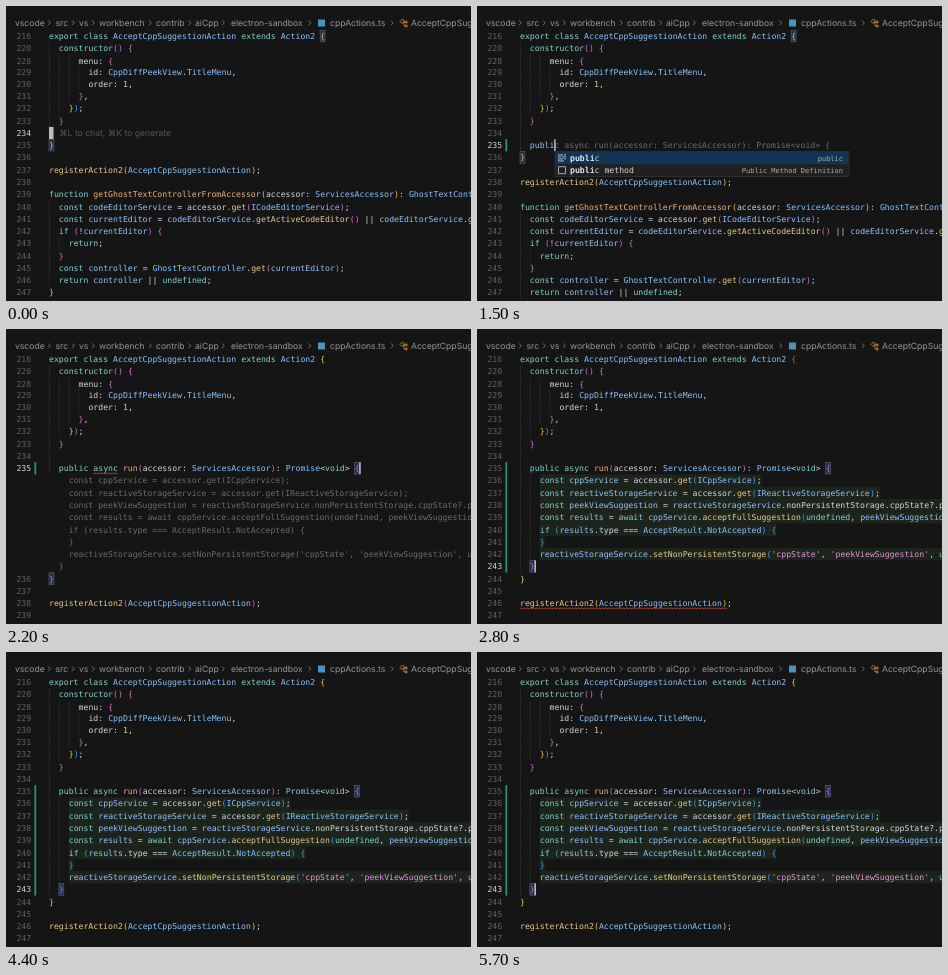
An HTML page that plays this animation: 465 by 295 pixels, repeating every 5.8 s.

```html
<!DOCTYPE html>
<html lang="en">
<head>
<meta charset="utf-8">
<style>
  html, body { margin: 0; width: 100%; height: 100%; overflow: hidden; background: #151515; }
  svg { display: block; }
  text { white-space: pre; text-rendering: geometricPrecision; }
  .code { font: 8.19px "DejaVu Sans Mono", monospace; }
  .ui { font: 8.6px Inter, sans-serif; fill: #969696; }
  .detail { font: 7px "DejaVu Sans Mono", monospace; fill: #a9adb3; text-anchor: end; }
</style>
</head>
<body>
<svg id="stage" width="465" height="295" viewBox="0 0 465 295"></svg>
<script>
const LOOP = 5800;
const LEFT = 43, CHAR = 4.93, LINE = 12.27;
const ENTER = 400, ACCEPT_LINE = 1900, SUGGEST = 2100, ACCEPT_BODY = 2600, CHECKED = 3050;
const TYPING = [[700, 'p'], [1100, 'pu'], [1200, 'pub'], [1300, 'publ'], [1400, 'publi'], [1600, 'public']];
const POPUP = 1200, GHOST = 1300;

const SIGNATURE = '  public async run(accessor: ServicesAccessor): Promise<void> {';
const BODY = [
  '    const cppService = accessor.get(ICppService);',
  '    const reactiveStorageService = accessor.get(IReactiveStorageService);',
  '    const peekViewSuggestion = reactiveStorageService.nonPersistentStorage.cppState?.peekViewSuggestion;',
  '    const results = await cppService.acceptFullSuggestion(undefined, peekViewSuggestion);',
  '    if (results.type === AcceptResult.NotAccepted) {',
  '    }',
  "    reactiveStorageService.setNonPersistentStorage('cppState', 'peekViewSuggestion', undefined);",
  '  }'
];
const HEAD = ['        id: CppDiffPeekView.TitleMenu,', '        order: 1,', '      },', '    });', '  }'];
const TAIL = [
  '}', '', 'registerAction2(AcceptCppSuggestionAction);', '',
  'function getGhostTextControllerFromAccessor(accessor: ServicesAccessor): GhostTextController {',
  '  const codeEditorService = accessor.get(ICodeEditorService);',
  '  const currentEditor = codeEditorService.getActiveCodeEditor() || codeEditorService.getFocused();',
  '  if (!currentEditor) {', '    return;', '  }',
  '  const controller = GhostTextController.get(currentEditor);',
  '  return controller || undefined;', '}'
];

const KEYWORD = /^(export|class|extends|constructor|public|async|await|const|function|if|return|undefined|void)$/;
const BRACKETS = ['#e9c84a', '#d070d0', '#3b9ff0'];
const PLAIN = '#d6d6dd';

const stage = document.getElementById('stage');
const colX = col => LEFT + col * CHAR;
const rowY = row => 65.6 + row * LINE;
const escape = s => s.replace(/&/g, '&amp;').replace(/</g, '&lt;');
const text = (x, y, s, attrs) => `<text x="${x.toFixed(2)}" y="${(y + 3).toFixed(2)}" ${attrs}>${escape(s)}</text>`;
const rect = (x, y, w, h, fill, extra = '') =>
  `<rect x="${x}" y="${y}" width="${w}" height="${h}" fill="${fill}" ${extra}/>`;
const stroke = (d, color, width) => `<path d="${d}" fill="none" stroke="${color}" stroke-width="${width}"/>`;
const code = (col, y, s, fill, extra = '') => text(colX(col), y, s, `class="code" fill="${fill}" ${extra}`);
const ghost = (col, y, s) => code(col, y, s, '#6c6c6c', 'font-style="italic"');
const bracketBox = (col, y) =>
  rect(colX(col), y - 5.8, CHAR, 11.6, '#1d3048', 'stroke="#56657c" stroke-width=".6"');
const cursor = (col, y) => rect(colX(col) - .2, y - 6, 1.2, 12, '#e4e4e4');

function squiggle(col, length, y) {
  let d = `M${colX(col)} ${y + 6}`;
  for (let i = 1; i * 1.5 <= length * CHAR; i++) d += `l1.5 ${i % 2 ? -1.5 : 1.5}`;
  return stroke(d, '#e0483c', .8);
}

function tokenStyle(word, before, after) {
  if (word[0] === "'") return ['#e394dc'];
  if (/^\d/.test(word)) return ['#ebc88d'];
  if (!/^\w/.test(word)) return [PLAIN];
  if (KEYWORD.test(word)) return ['#82d2ce'];
  if (word === 'accessor') return [PLAIN, 'font-style="italic"'];
  if (after[0] === '(') {
    return /(function|async) $/.test(before) ? ['#efb080', 'font-weight="bold"'] : ['#ebc88d'];
  }
  if (/^[A-Z]/.test(word)) return ['#87c3ff'];
  return before.endsWith('.') || after[0] === ':' ? [PLAIN] : ['#94c1fa'];
}

// Colours source lines; bracket depth carries on from line to line.
function highlighter(firstBracket) {
  let depth = 0, seen = 0;
  const bracketColor = ch => {
    if ('({'.includes(ch)) {
      const color = BRACKETS[depth++ % 3];
      return seen++ ? color : firstBracket;
    }
    depth = Math.max(0, depth - 1);
    return BRACKETS[depth % 3];
  };
  return (line, y) => {
    let out = '';
    for (const m of line.matchAll(/'[^']*'|\w+|[(){}]|[^\s\w(){}']+/g)) {
      const word = m[0], after = line.slice(m.index + word.length);
      const style = /[(){}]/.test(word) ? [bracketColor(word)] : tokenStyle(word, line.slice(0, m.index), after);
      out += code(m.index, y, word, ...style);
    }
    return out;
  };
}

function guides(line, y) {
  const indent = line.search(/\S/);
  let out = '';
  for (let col = 0; col < indent; col += 2) out += rect(colX(col), y - 6.2, .6, 12.4, '#303030');
  return out;
}

function breadcrumb() {
  const parts = [[9, 'vscode'], [49.5, 'src'], [73, 'vs'], [93, 'workbench'], [150, 'contrib'],
    [189, 'aiCpp'], [225, 'electron-sandbox'], [324, 'cppActions.ts'], [405, 'AcceptCppSuggestionAction']];
  const chevrons = [42, 66, 86, 143, 182.5, 216, 302.5, 385];
  return parts.map(([x, s]) => text(x, 16.6, s, 'class="ui"')).join('') +
    chevrons.map(x => stroke(`M${x} 14.4l2.3 2.4l-2.3 2.4`, '#858585', .8)).join('') +
    rect(312, 13.5, 7, 7, '#4b93b8') +
    stroke('M394 15.5l2.5-2.5l2 2l-2.5 2.5zM397 16h3M398 16v4h2M400 14.7l1.5 1.3l-1.5 1.3zM400 18.7l1.5 1.3l-1.5 1.3z', '#e0913c', .8);
}

function popup(typed) {
  const top = rowY(6) + 6.4, first = top + 6.3, second = first + LINE;
  return rect(78, top, 294, 25, '#202020', 'stroke="#3a3a3a" stroke-width=".6"') +
    rect(78.3, top + .3, 293.4, 12.3, '#123455') +
    stroke(`M81 ${first - 3}h5m1 0h2m-8 2h3m1 0h4m-8 2h5m1 0h2m-8 2h6`, '#c8c8c8', .9) +
    stroke(`M81.5 ${second - 3.5}h7v7h-7z`, '#b8b8b8', .9) +
    [['public', 'public', first], ['public method', 'Public Method Definition', second]].map(([name, detail, y]) =>
      text(93, y, name, 'class="code" fill="#d6d6dd"') +
      text(93, y, typed, 'class="code" fill="#e6eefa" font-weight="bold"') +
      text(366, y - .4, detail, 'class="detail"')).join('');
}

function stateAt(t) {
  return {
    entered: t >= ENTER,
    typed: TYPING.reduce((s, [at, word]) => t >= at ? word : s, ''),
    popup: t >= POPUP && t < ACCEPT_LINE,
    ghost: t >= GHOST && t < ACCEPT_LINE,
    lineDone: t >= ACCEPT_LINE,
    suggested: t >= SUGGEST && t < ACCEPT_BODY,
    bodyDone: t >= ACCEPT_BODY,
    stale: t >= ACCEPT_BODY && t < CHECKED,
    cursorOn: t < ACCEPT_BODY || (t - ACCEPT_BODY) % 1000 < 500
  };
}

function draw(s) {
  const active = s.lineDone ? SIGNATURE : '  ' + s.typed;
  const highlight = highlighter(s.stale ? '#b5602f' : BRACKETS[0]);
  const current = s.bodyDone ? 243 : s.entered ? 235 : 234;
  let out = rect(0, 0, 465, 295, '#151515') + breadcrumb();

  const drawLine = (number, line, y) => {
    if (!line.trim() && number < 236 && number > 233) out += guides('  .', y);
    out += guides(line, y) + highlight(line, y);
    out += text(25.2, y, String(number), `class="code" text-anchor="end" fill="${number === current ? '#d0d0d0' : '#606060'}"`);
  };

  // The class end matches the open bracket while the cursor sits outside the new body.
  const endRow = s.entered ? (s.suggested || s.bodyDone ? 15 : 7) : 6;
  if (!s.bodyDone) out += bracketBox(0, rowY(endRow));
  if (s.lineDone) out += bracketBox(SIGNATURE.length - 1, rowY(6));
  else out += bracketBox(55, 30);
  if (s.bodyDone) {
    BODY.forEach((line, i) => {
      const indent = line.search(/\S/);
      out += rect(colX(indent), rowY(7 + i) - 6.1, (line.length - indent) * CHAR, 12.3, '#1c241c');
    });
    out += bracketBox(2, rowY(14));
  }

  drawLine(216, 'export class AcceptCppSuggestionAction extends Action2 {', 30);
  drawLine(220, '  constructor() {', 30 + LINE);
  highlight('super({', 0);
  drawLine(228, '      menu: {', 30 + 2 * LINE);

  let row = 0, number = 229;
  const add = lines => lines.forEach(line => drawLine(number++, line, rowY(row++)));
  add(HEAD);
  add(['']);
  if (s.entered) add([active]);
  if (s.bodyDone) add(BODY);
  if (s.suggested) BODY.forEach(line => { out += ghost(0, rowY(row++), line); });
  add(TAIL);

  if (s.entered) {
    out += rect(28.4, rowY(6) - 6.1, 1.8, LINE * (s.bodyDone ? 9 : 1), '#26917a');
  } else {
    out += rect(LEFT, rowY(5) - 6, 4.5, 12, '#bdbdbd') +
      text(53, rowY(5), '⌘L to chat, ⌘K to generate', 'class="ui" style="fill:#555"');
  }
  if (s.ghost) out += ghost(active.length, rowY(6), SIGNATURE.slice(active.length));
  if (s.lineDone && !s.bodyDone) out += squiggle(9, 5, rowY(6));
  if (s.stale) out += squiggle(0, 42, rowY(17));
  if (s.entered && s.cursorOn) {
    out += s.bodyDone ? cursor(3, rowY(14)) : cursor(active.length, rowY(6));
  }
  if (s.popup) out += popup(s.typed);
  stage.innerHTML = out;
}

let shown = '';
function tick() {
  const state = stateAt(performance.now() % LOOP);
  const key = JSON.stringify(state);
  if (key !== shown) {
    shown = key;
    draw(state);
  }
  requestAnimationFrame(tick);
}
tick();
</script>
</body>
</html>
```
